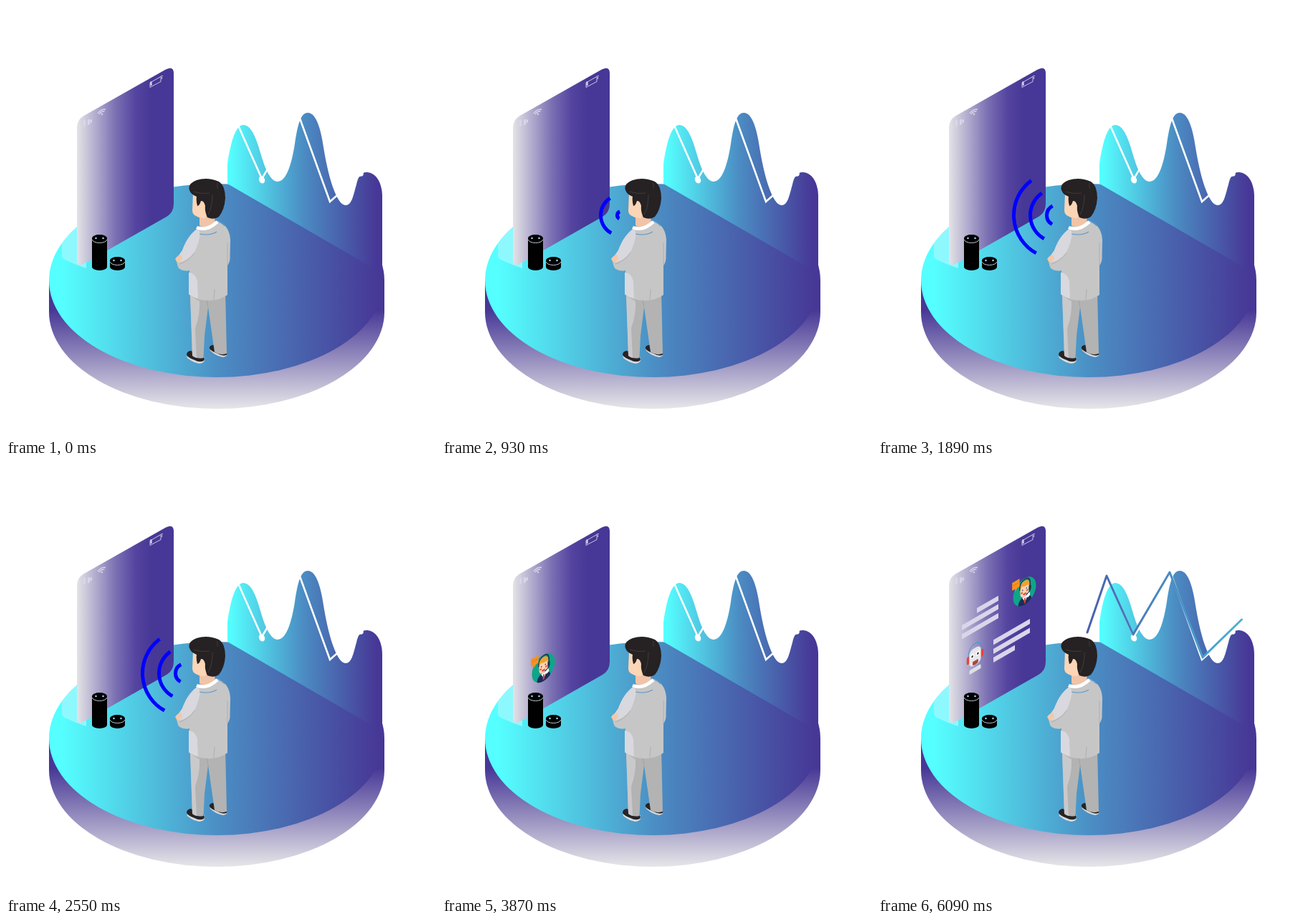
Recreate the animation shown at these times as an HTML page. Size 600x600 px, loop 6540 ms.

```html
<!DOCTYPE html>
<html lang="en">
<head>
<meta charset="utf-8">
<title>Voice assistant</title>
<style>
html, body { margin: 0; width: 100%; height: 100%; overflow: hidden; background: #fff; }
svg { display: block; width: 100vw; height: 100vh; }
</style>
</head>
<body>
<svg viewBox="0 0 600 600" fill="none">
  <defs>
    <linearGradient id="floor" gradientUnits="userSpaceOnUse" x1="78" x2="522" y1="0" y2="0">
      <stop stop-color="#55ffff"/><stop offset=".5" stop-color="#4b8cc3"/><stop offset="1" stop-color="#473796"/>
    </linearGradient>
    <linearGradient id="hills" gradientUnits="userSpaceOnUse" x1="312" x2="518" y1="0" y2="0">
      <stop stop-color="#55ffff"/><stop offset=".5" stop-color="#4b8cc3"/><stop offset="1" stop-color="#473796"/>
    </linearGradient>
    <linearGradient id="side" gradientUnits="userSpaceOnUse" x1="0" x2="0" y1="424" y2="562">
      <stop stop-color="#473796"/><stop offset="1" stop-color="#e6e6e8"/>
    </linearGradient>
    <linearGradient id="glass" gradientUnits="userSpaceOnUse" x1="99" x2="234" y1="0" y2="0">
      <stop stop-color="#e3e3e6"/><stop offset=".2" stop-color="#b0aacd"/><stop offset=".4" stop-color="#7b70b3"/>
      <stop offset=".6" stop-color="#5545a0"/><stop offset=".78" stop-color="#473796"/>
    </linearGradient>
    <linearGradient id="trend" gradientUnits="userSpaceOnUse" x1="292" x2="508" y1="0" y2="0">
      <stop stop-color="#4a60ae"/><stop offset="1" stop-color="#4cb3d6"/>
    </linearGradient>
    <clipPath id="top"><ellipse cx="294" cy="383" rx="234" ry="135"/></clipPath>
    <clipPath id="disc"><circle r="18.5"/></clipPath>
  </defs>

  <!-- platform -->
  <path fill="url(#side)" d="M60 383V427A234 135 0 0 0 528 427V383Z"/>
  <ellipse cx="294" cy="383" rx="234" ry="135" fill="url(#floor)"/>
  <path clip-path="url(#top)" fill="#8df9ff" d="M78 310H112V366L98 361L82 354Q78 352 78 348Z"/>

  <!-- chart -->
  <path fill="url(#hills)" d="M309 248V221C313 192 320 166 331 166C343 166 350 187 356 208C362 229 370 245 379 245C393 245 400 212 403 192C407 166 411 149 421 149C434 149 440 175 444 203C450 238 461 278 474 278C483 278 485 262 489 249C491 239 495 232 503 232C516 232 525 246 525 266V373Z"/>
  <path stroke="#fff" stroke-width="2.6" d="M293 239L321 160L357 241L409 154L452 273L496 234"/>
  <ellipse cx="357" cy="242.500" rx="4" ry="5.200" fill="#fff" transform="rotate(-25 357 242.500)"/>
  <circle cx="495" cy="234" r="3.800" fill="#fff"/>
  <path id="line" stroke="url(#trend)" stroke-width="3" stroke-linecap="round" stroke-linejoin="round" pathLength="1" d="M292 235L319 156L356 238L407 151L453 270L507.500 217"/>

  <!-- screen -->
  <path fill="url(#glass)" d="M99 170Q99 159 108 153.500L223 88.500Q234 83 234 94V276Q234 288 224 294L108 360Q99 364 99 355Z"/>
  <g fill="#d9d5e8">
    <path d="M108 160L111 158V167L108 168.500ZM114 159L117 157.500V165L114 166.500ZM117.500 159L120 158V162L117.500 163.500Z"/>
    <circle cx="134" cy="151" r="1.200"/>
  </g>
  <g stroke="#d9d5e8" stroke-width="1.300">
    <path d="M128 150Q133 143 139 144.500M130 151.200Q133.500 146 137.500 147.200"/>
    <path stroke-width=".9" d="M201 107V113.500L216 105.500V98.500ZM217.500 99V102M216 98L219 97.500"/>
    <path stroke-width="2.200" d="M202.500 105.500V111"/>
  </g>

  <!-- conversation -->
  <g id="ask" fill="#d9d6ea"></g>
  <g id="reply" fill="#d9d6ea"></g>
  <g id="agent"><g transform="matrix(.866 -.5 0 1 0 0)">
    <circle r="18.500" fill="#0fa589"/>
    <g clip-path="url(#disc)">
      <path fill="#1d2b5c" d="M-11 20Q-11 9 -4 7H5Q12 9 12 20Z"/>
      <path fill="#fff" d="M-4 7H5L1 15Z"/>
      <path fill="#d8433a" d="M-.5 9H1.500L2 15L.5 17L-1 15Z"/>
    </g>
    <rect x="-7" y="-11" width="14" height="18" rx="6.500" fill="#fbd3b0"/>
    <path fill="#f2a12e" d="M-8 -4Q-9 -15 0 -15Q9 -15 8 -4L6 -7Q0 -6 -4 -9Z"/>
    <path stroke="#23304f" stroke-width="1.600" d="M-8 -5Q-8 -17 1 -17Q10 -17 9 -4V2Q7 6 2 5"/>
    <rect x="7" y="-5" width="3.500" height="7" rx="1.500" fill="#23304f"/>
    <path fill="#e6463c" d="M-3 2H3Q2 5 0 5Q-2 5 -3 2ZM-6 -1H-3V1H-6ZM3 -1H6V1H3Z"/>
    <path fill="#23304f" d="M-4 -4H-2.500V-2.500H-4ZM2.500 -4H4V-2.500H2.500Z"/>
    <path fill="#fff" d="M3 7L8 4L9 9L5 11Z"/>
    <path fill="#f7921e" d="M-20 -22H-8V-11H-12L-15 -7V-11H-20Z"/>
    <path stroke="#c8691b" stroke-width="1" stroke-dasharray="1.500 1.500" d="M-18 -17H-10"/>
  </g></g>
  <g id="bot"><g transform="matrix(.866 -.5 0 1 0 0)">
    <path stroke="#4b9ad6" stroke-width="1.300" d="M-11 -3Q-11 -18 0 -18Q11 -18 11 -3"/>
    <rect x="-13.500" y="-5" width="5" height="11" rx="2.400" fill="#e5443d"/>
    <rect x="8.500" y="-5" width="5" height="11" rx="2.400" fill="#e5443d"/>
    <path fill="#dfdfe6" d="M-8 15H8Q10 16 9 21H-9Q-10 16 -8 15Z"/>
    <rect x="-9.500" y="-12" width="19" height="24" rx="7" fill="#e6e6ea"/>
    <g fill="#fff"><circle cx="-4.500" cy="-2.500" r="3.200"/><circle cx="4.500" cy="-2.500" r="3.200"/></g>
    <g fill="#222"><circle cx="-4.500" cy="-2" r="1.400"/><circle cx="4.500" cy="-2" r="1.400"/></g>
    <path fill="#7b4a3c" d="M-4 6H5V10Q0 13 -4 10Z"/>
    <path stroke="#e5443d" stroke-width="1.300" d="M-3 5.500V11M0 5.500V12M3 5.500V11"/>
  </g></g>

  <!-- speakers -->
  <g fill="#000">
    <path d="M120 324A10.500 5 0 0 1 141 324V364A10.500 5 0 0 1 120 364Z"/>
    <path d="M145 355A10.500 5 0 0 1 166 355V364A10.500 5 0 0 1 145 364Z"/>
  </g>
  <g stroke="#b9c9cf" stroke-width="1">
    <path d="M120.500 326A10 4.500 0 0 0 140.500 326M145.500 357A10 4.500 0 0 0 165.500 357"/>
  </g>
  <g fill="#9fd0e6">
    <circle cx="125.500" cy="324" r="1.300"/><circle cx="135.500" cy="324" r="1.300"/>
    <circle cx="150.500" cy="355" r="1.300"/><circle cx="160.500" cy="355" r="1.300"/>
  </g>

  <path id="waves" stroke="#0000ff" stroke-width="5"/>

  <!-- man -->
  <g>
    <path fill="#dcdcdc" d="M252 486L253 491Q261 498 270 499Q277 498 277 494V490ZM284 477L285 481Q294 489 303 490Q309 489 309 485Z"/>
    <path fill="#262426" d="M252 487Q252 482 258 481L275 489Q278 492 276 495Q270 498 263 494Q253 490 252 487ZM284 478Q283 474 289 473L306 482Q310 485 308 487Q302 489 295 485Q285 481 284 478Z"/>
    <path fill="#b3b3b3" d="M257 398L260 488Q267 493 275.500 491L277 460L282 420L291 483Q299 488 308 485L306 396Z"/>
    <path fill="#c9c9cb" d="M257 404L260 488Q263 490.500 266 491L264 450Q271 430 270 412Z"/>
    <path stroke="#a2a2a2" d="M282 420L280 410"/>
    <path fill="#c6c6c6" d="M270 307L262 316Q252 325 246 341L238 352Q238 360 241 366Q248 371 256 369L255 402Q266 411 284 411Q300 410 309 403L309 362Q313 357 312.500 350L313 326Q312 307 296 300Z"/>
    <path fill="#d8d8de" d="M268 310Q253 320 246 341L240 350L242 358Q254 355 262 345Q268 335 271 318ZM255 372Q264 372 267 384L268 408Q259 406 255 402Z"/>
    <path stroke="#afafb1" d="M242 360Q255 356 263 344M291 395L290 410M309 362Q309 340 309 330"/>
    <path fill="#f3c8aa" d="M236 353Q239 348 244 347L246 352Q243 358 239 358Z"/>
    <path fill="#f0c4a8" d="M270 288L291 294L292 304Q280 311 270 306Z"/>
    <path fill="#fbd5b6" d="M261 261L260 285Q260 291 265 293Q271 297 278 296L284 280L279 260Z"/>
    <path stroke="#fff" stroke-width="4.500" d="M266 309Q280 315 295 301"/>
    <path stroke="#5b96c8" stroke-width="1.200" d="M270 318Q284 321 294 315M296 301Q302 303 305 307"/>
    <path fill="#262122" d="M256 257Q253 248 266 243Q281 238 297 245Q306 251 306 268Q305 284 297 294Q290 299 281 295Q277 286 278 279Q276 271 272 272Q270 279 267 279Q265 272 266 266Q258 263 256 257Z"/>
    <path stroke="#4a4243" stroke-width=".8" d="M262 259Q273 263 284 261M295 247V255M288 263Q288 281 282 291"/>
  </g>
</svg>
<script>
const LOOP = 6540, STEP = 30;
const $ = id => document.getElementById(id);
const part = (t, from, to) => Math.min(1, Math.max(0, (t - from) / (to - from)));
const show = (el, on) => el.setAttribute('visibility', on ? 'visible' : 'hidden');
const move = (el, x, y) => el.setAttribute('transform', `translate(${x} ${y})`);

// A text bar lying on the tilted screen.
const bar = (x, y, w) => `<path d="M${x} ${y}l${w} ${-w * .577}v7l${-w} ${w * .577}z"/>`;
$('ask').innerHTML = bar(138, 201, 30) + bar(117, 225, 51) + bar(117, 237.4, 51);
$('reply').innerHTML = bar(161, 245.4, 51) + bar(161, 258, 51) + bar(161, 270, 30);

function arc(r) {
  const point = deg => {
    const a = deg * Math.PI / 180;
    return `${250 - r * Math.cos(a)} ${292 + r * Math.sin(a)}`;
  };
  const up = Math.min(70, 50 + 200 / r);
  return `M${point(-up)}A${r} ${r} 0 0 0 ${point(61)}`;
}

function waves(t) {
  if (t >= 2850) return '';
  let d = '';
  for (let born = 0; born < t; born += 690) {
    const age = t - born;
    if (age < 2010) d += arc(Math.max(.5, age / 30 - 2.5));
  }
  return d;
}

function draw(t) {
  $('waves').setAttribute('d', waves(t));

  const a = part(t, 3870, 4200);
  move($('agent'), 141.5 + 63 * a, 284.5 - 106.5 * a);
  show($('agent'), t >= 3870);
  show($('ask'), t >= 4410);

  const b = 1 - part(t, 4680, 4950);
  move($('bot'), 135.5 + 6.3 * b, 268.5 + 23 * b);
  show($('bot'), t >= 4680);
  show($('reply'), t >= 5100);

  const p = part(t, 5520, 6090);
  $('line').setAttribute('stroke-dasharray', p < 1 ? `${p} 2` : 'none');
  show($('line'), p > 0);
}

const start = performance.now();
function tick() {
  const t = (performance.now() - start) % LOOP;
  draw(Math.floor(t / STEP) * STEP);
  requestAnimationFrame(tick);
}
tick();
</script>
</body>
</html>
```
